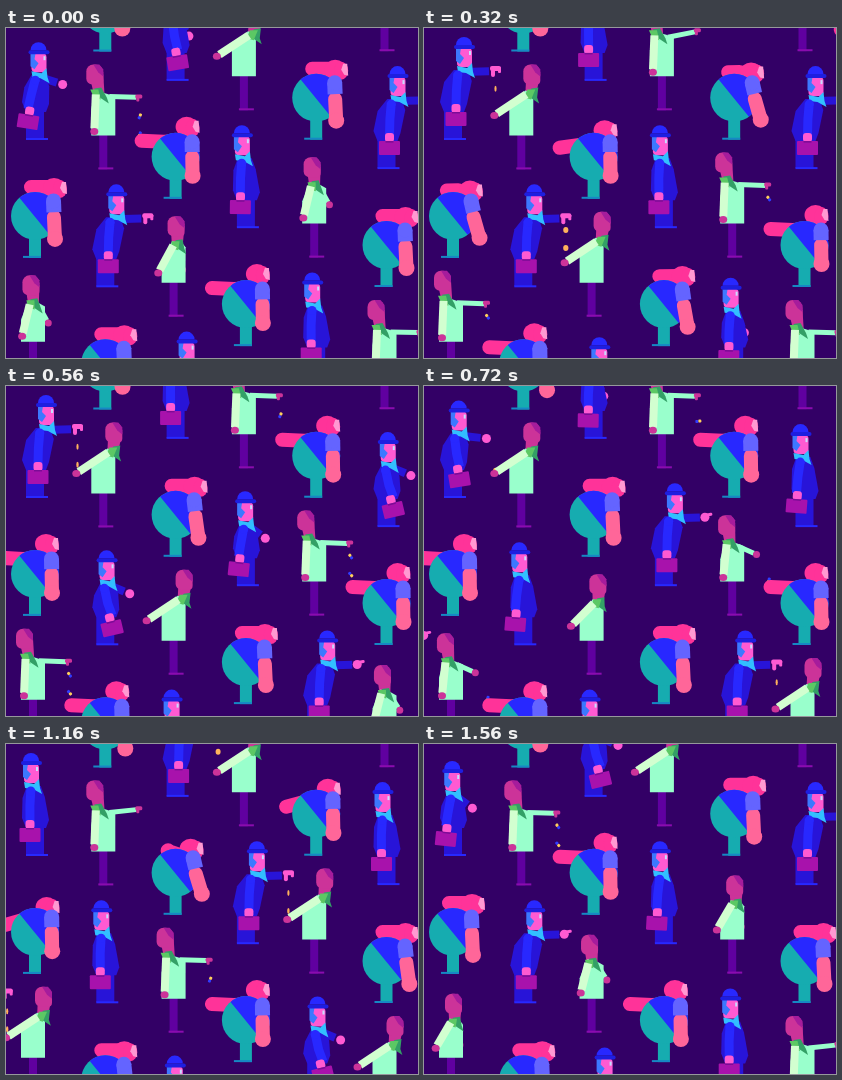
An HTML page with a canvas for the animation above (1.6 s loop, 412 by 330 pixels).

```html
<!DOCTYPE html>
<html lang="en">
<head>
<meta charset="utf-8">
<title>Passing it along</title>
<style>
html, body { margin: 0; width: 100%; height: 100%; overflow: hidden; background: #330066; }
canvas { display: block; }
</style>
</head>
<body>
<canvas id="stage" width="412" height="330"></canvas>
<script>
const ctx = document.getElementById('stage').getContext('2d');
const LOOP = 1600, STEP = 40;

// ---- timing helpers ----
const mod = (a, n) => ((a % n) + n) % n;
const mix = (a, b, u) => a + (b - a) * u;
function smooth(u) {
  u = Math.min(1, Math.max(0, u));
  return u * u * (3 - 2 * u);
}
// Rises to 1 after `from`, falls back to 0 after `to`; wraps around the loop
function hold(p, from, to, ease) {
  const since = mod(p - from, LOOP), length = mod(to - from, LOOP);
  return since < length ? smooth(since / ease) : 1 - smooth((since - length) / ease);
}
// Short swell centred on `peak`
function bump(p, peak, half) {
  const d = Math.abs(mod(p - peak + LOOP / 2, LOOP) - LOOP / 2);
  return smooth(1 - d / half);
}

// ---- drawing helpers ----
function box(color, x, y, w, h, r = 0) {
  ctx.fillStyle = color;
  ctx.beginPath();
  ctx.roundRect(x, y, w, h, r);
  ctx.fill();
}
function disc(color, x, y, rx, ry = rx) {
  ctx.fillStyle = color;
  ctx.beginPath();
  ctx.ellipse(x, y, rx, ry, 0, 0, Math.PI * 2);
  ctx.fill();
}
function poly(color, ...points) {
  ctx.fillStyle = color;
  ctx.beginPath();
  points.forEach(([x, y]) => ctx.lineTo(x, y));
  ctx.fill();
}
function stroke(color, width, cap, ...points) {
  ctx.strokeStyle = color;
  ctx.lineWidth = width;
  ctx.lineCap = cap;
  ctx.lineJoin = 'round';
  ctx.beginPath();
  points.forEach(([x, y]) => ctx.lineTo(x, y));
  ctx.stroke();
}
function at(x, y, angle, draw) {
  ctx.save();
  ctx.translate(x, y);
  ctx.rotate(angle);
  draw();
  ctx.restore();
}
// Sleeve that stops a little short of the hand
function sleeve(color, width, x, y, hx, hy, gap) {
  const d = Math.hypot(hx - x, hy - y) || 1, k = Math.max(0, d - gap) / d;
  stroke(color, width, 'butt', [x, y], [mix(x, hx, k), mix(y, hy, k)]);
}
// Three things dropped one after the other at constant speed
function drops(p, first, top, bottom, draw) {
  for (let n = 0; n < 3; n++) {
    const y = top + (p - first - n * 120) * 0.15;
    if (y >= top && y < bottom) draw(y);
  }
}

// ---- figures: origin between the feet, p is the time in their own loop ----
function man(p) {
  const reach = hold(p, 1500, 640, 200);
  const dip = 8 * (bump(p, 1560, 100) + bump(p, 760, 110));
  const swing = 9 * bump(p, 760, 110) - 3 * bump(p, 920, 110) - 6 * bump(p, 0, 100);
  const lean = mix(-2, 13, reach), sx = lean * 0.6, top = -70 + dip;
  const hx = mix(5, 42, reach) + dip * 0.8, hy = mix(-42, -69, reach);
  const cx = mix(-5, 3, reach) + swing, cy = -21 + dip * 0.5;
  const coat = '#2814d8', blue = '#2828ff', skin = '#ff5ad2';

  sleeve(coat, 8, sx + 2, top + 2, hx, hy, 6);
  if (hy > -60) {
    disc(skin, hx, hy, 4.5);
  } else if (p < 200) {
    disc(skin, hx - 1, hy, 4.5);
    stroke(skin, 3, 'round', [hx, hy - 2], [hx + 5, hy - 3]);
  } else {
    box(skin, hx - 5, hy - 5, 11, 5, 2);
    box(skin, hx - 4, hy - 2, 4, 8, 2);
    box(skin, hx + 3, hy - 4, 3, 6, 1);
  }

  box(coat, -9, -40, 18, 39);
  box(blue, -9, -2, 22, 2);
  poly(coat, [sx - 7, top], [sx + 7, top], [sx + 11, top + 11],
    [14, -36], [11, -28], [-9, -28], [-13, -38], [sx * 0.4 - 12, top + 12]);

  // head, beard, scarf and hat
  const x = lean - 2, y = -96 + dip;
  box(skin, x - 7, y + 4, 15, 19, 4);
  poly('#3c78ff', [x - 8, y + 4], [x - 3, y + 4], [x - 4, y + 10], [x, y + 14], [x - 4, y + 20], [x - 8, y + 17]);
  box('#c8dcff', x + 5, y + 7, 2, 4);
  poly('#32bfff', [x - 7, y + 22], [x + 3, y + 24], [x + 8, y + 19], [x + 9, y + 28], [x + 11, y + 34], [x + 2, y + 29], [x - 6, y + 28]);
  ctx.fillStyle = blue;
  ctx.beginPath();
  ctx.arc(x, y + 1, 8, Math.PI, 0);
  ctx.fill();
  box('#1e1ee0', x - 10, y + 1, 21, 4, 2);

  // arm with the case
  stroke(blue, 9, 'butt', [sx - 3, top + 4], [mix(sx, cx, 0.5) - 2, -50 + dip], [cx, cy - 13]);
  disc(blue, sx - 3, top + 5, 4.5);
  at(cx, cy, -swing * 0.026, () => {
    box(skin, -4.5, -15, 9, 9, 3);
    box('#a812ac', -10.5, -7, 21, 14, 1);
    box('#7c0c96', -4, -7, 8, 1.5);
  });

  drops(p, 235, -64, -24, y => {
    disc('#ffb25c', 42.5, y, 1 + 1.8 * Math.abs(Math.sin((y + 51) * 0.17)), 3);
  });
}

function woman(p) {
  const take = hold(p, 1520, 640, 200), give = hold(p, 740, 1440, 180);
  const dip = 7 * (bump(p, 1560, 100) + bump(p, 760, 100));
  const x = -3 + 12 * take - 7 * give, y = -95 + dip;
  const neck = x * 0.65, top = -74 + dip * 0.8;
  const lx = mix(-11, -29, take), ly = mix(-38, -54, take);
  const rx = mix(6, 34, give), ry = mix(-46, -72, give) - 7 * bump(p, 920, 90);
  const coat = '#99ffcc', skin = '#cc3399';

  box('#6000a0', -6, -36, 8, 36);
  box('#8a0cae', -7, -2, 15, 2);

  sleeve(coat, 5, 4, top + 1, rx, ry, 3);
  if (ry < -66) {
    box(skin, rx - 4, ry - 3, 7, 4, 1.5);
    box(skin, rx - 3, ry, 3, 4, 1);
  } else {
    disc(skin, rx, ry, 3.5);
  }

  poly(skin, [x - 6, y], [x + 8, y], [neck + 6, top + 3], [neck - 4, top + 3]);
  poly(coat, [neck - 4, top - 5], [neck + 7, top - 2], [10, top + 1], [10, -34], [-14, -34], [-14, top + 14]);
  poly('#33a066', [x - 1, y + 14], [x + 6, y + 13], [neck + 8, top + 2], [neck + 10, top + 8], [neck - 2, top]);
  poly('#5cc864', [x - 5, y + 15], [x + 3, y + 15], [neck + 2, top + 4], [neck - 5, top + 2]);
  box(skin, x - 9, y - 10, 17, 20, [7, 8, 4, 6]);
  poly('#a61c9c', [x - 2, y - 10], [x + 4, y - 10], [x + 8, y - 5], [x + 8, y + 2], [x + 3, y - 2]);

  sleeve('#d2ffd0', 8, neck - 3, top - 1, lx, ly, 3);
  disc(skin, lx, ly, 4, 3.5);

  drops(p, 1087, -64, -32, y => at(34.5, y, y * 0.17, () => {
    box('#303cff', -1.5, -3, 3, 3, 1);
    box('#ffd05c', -1.5, 0, 3, 3, 1);
  }));
}

function hiker(p) {
  const out = hold(p, 640, 1520, 240);
  const droop = bump(p, 1560, 110), dip = bump(p, 760, 100);
  const x = mix(22, 14, out), y = mix(-70, -72, out) + 5 * (droop + dip);
  const ex = mix(-4, -12, out), ey = mix(-71, -57, out) + 4 * droop;
  const hx = mix(19, -34, out), hy = mix(-71, -58, out) + 10 * droop;
  const swing = 8 * bump(p, 745, 140) + 4 * bump(p, 110, 140);
  const ax = mix(20, 17, out) + swing, ay = mix(-19, -23, out);
  const skin = '#ff3399', teal = '#16acb0', coral = '#ff6699', lilac = '#6464ff';

  // raised arm and head tuck in behind the back
  stroke(skin, 14, 'round', [10, -58], [ex, ey], [hx, hy]);
  disc(skin, x - 3, y, 11, 10);
  disc(skin, x + 3, y + 1, 7, 9);
  poly('#ff99d2', [x + 5, y - 6], [x + 9, y - 6], [x + 10, y + 6], [x + 6, y + 5], [x + 3, y]);

  box(teal, -6, -28, 12, 28);
  box('#1688c4', -12, -2, 18, 2);
  ctx.save();
  ctx.beginPath();
  ctx.arc(0, -42, 24, 0, Math.PI * 2);
  ctx.clip();
  box(teal, -25, -67, 50, 50);
  poly('#2828ff', [-17, -62], [-10, -70], [28, -70], [28, -19], [18, -19]);
  ctx.restore();

  // hanging arm
  const sx = mix(18.5, 16.5, out), sy = -57, mx = mix(sx, ax, 0.3), my = mix(sy, ay, 0.3);
  stroke(coral, 14, 'round', [mx, my + 5], [ax, ay]);
  disc(coral, ax, ay, 8);
  stroke(lilac, 15, 'butt', [sx, sy], [mx, my]);
  disc(lilac, sx, sy, 7.5);
}

const FIGURES = [man, hiker, woman];

// The same chain repeats on a slanted lattice, each neighbour starting a little later
function draw(t) {
  ctx.fillStyle = '#330066';
  ctx.fillRect(0, 0, 412, 330);
  for (let col = -1; col <= 6; col++) {
    for (let row = -4; row <= 4; row++) {
      const x = 29 + 70.3 * col, y = 112 + 29.4 * col + 117.9 * row;
      if (y < -10 || y > 450) continue;
      const p = mod(t - 200 * col + 400 * row, LOOP);
      at(x, y, 0, () => FIGURES[mod(row - col, 3)](p));
    }
  }
}

const start = performance.now();
function tick() {
  const t = mod(performance.now() - start, LOOP);
  draw(Math.floor(t / STEP) * STEP);
  requestAnimationFrame(tick);
}
tick();
</script>
</body>
</html>
```
